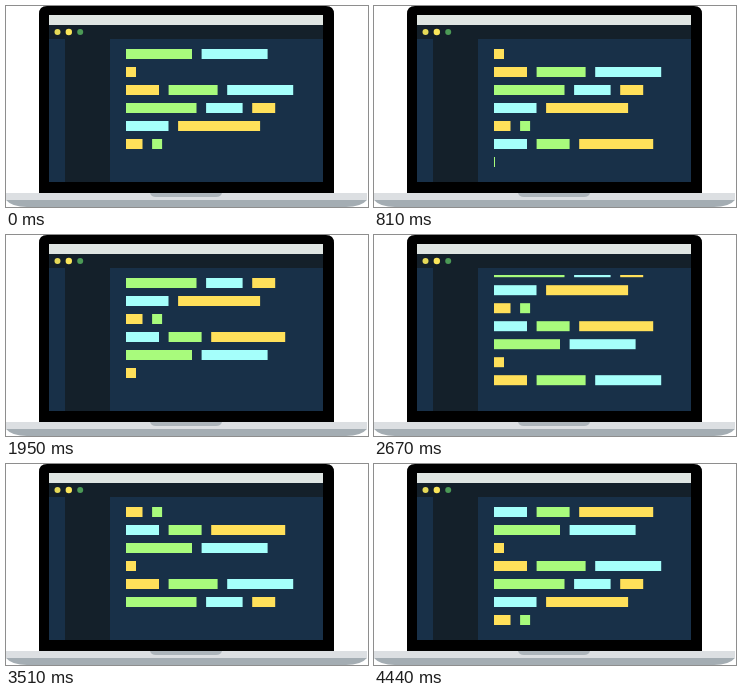
An HTML page for the animation above (4.5 s loop, 362 px wide and 201 px high).

```html
<!DOCTYPE html>
<html lang="en">
<head>
<meta charset="utf-8">
<title>Laptop typing code</title>
<style>
  html, body { margin: 0; width: 100%; height: 100%; overflow: hidden; background: #fff; }
  svg { display: block; width: 362px; height: 201px; }
  .g { fill: #a8fb7c; }
  .c { fill: #a5fffb; }
  .y { fill: #ffe05a; }
</style>
</head>
<body>
<svg viewBox="0 0 362 201">
  <defs>
    <clipPath id="view"><rect x="104" y="40" width="213" height="136"/></clipPath>
  </defs>

  <!-- lid and screen -->
  <path d="M33 187V8Q33 0 41 0H320Q328 0 328 8V187Z" fill="#000"/>
  <rect x="43" y="9" width="274" height="167" fill="#183048"/>
  <rect x="43" y="9" width="274" height="10" fill="#dfe5e2"/>
  <rect x="43" y="19" width="274" height="14" fill="#14202a"/>
  <rect x="59" y="33" width="45" height="143" fill="#14202a"/>
  <circle cx="51.5" cy="26" r="3" fill="#e6da58"/>
  <circle cx="62.8" cy="26" r="3.2" fill="#fbe65a"/>
  <circle cx="74.2" cy="26" r="3" fill="#4c9a56"/>

  <!-- base -->
  <path d="M0 194H361Q355 201 340 201H21Q6 201 0 194Z" fill="#a4adb3"/>
  <path d="M0 187H361V194H0Z" fill="#dcdfe2"/>
  <path d="M144 187H216Q215 191 210 191H150Q145 191 144 187Z" fill="#adb5bb"/>

  <g clip-path="url(#view)"><g id="code"></g></g>
</svg>
<script>
  const LOOP = 4500, FRAME = 30, PAUSE = 90, SCROLL = 150;
  const LEFT = 120, TOP = 43, ROW = 18, GAP = 9.6, SHOWN = 6;

  // each bar is a colour letter and a width
  const lines = [
    'g66 c66',
    'y10',
    'y33 g49 c66',
    'g70.5 c36.5 y23',
    'c42.5 y82',
    'y16.5 g10',
    'c33 g33 y74'
  ];
  const code = document.getElementById('code');
  const bars = [], scrolls = [];
  let clock = FRAME;

  function addBar(color, x, row, width) {
    const el = document.createElementNS('http://www.w3.org/2000/svg', 'rect');
    el.setAttribute('class', color);
    el.setAttribute('x', x);
    el.setAttribute('y', TOP + row * ROW);
    el.setAttribute('width', width);
    el.setAttribute('height', 10);
    code.append(el);
    return el;
  }

  for (let row = 0; row < SHOWN + lines.length; row++) {
    const typed = row >= SHOWN;
    const line = lines[row % lines.length].split(' ');
    let x = LEFT;
    for (const item of line) {
      const width = +item.slice(1);
      const el = addBar(item[0], x, row, width);
      x += width + GAP;
      if (typed) {
        const time = width >= 66 ? 150 : 60;
        bars.push({ el, width, start: clock, time });
        clock += time + PAUSE;
      }
    }
    if (typed) {
      if (line.length === 1) clock += 120; // the shortest line rests longer
      scrolls.push(clock);
      clock += SCROLL + PAUSE;
    }
  }

  const progress = (t, start, time) => Math.min(1, Math.max(0, (t - start) / time));

  function draw(t) {
    for (const { el, width, start, time } of bars) {
      const w = t < start ? 0 : Math.max(1, width * progress(t, start, time));
      el.setAttribute('width', w);
    }
    const rows = scrolls.reduce((sum, start) => sum + progress(t, start, SCROLL), 0);
    code.setAttribute('transform', `translate(0 ${-rows * ROW})`);
  }

  const begin = performance.now();
  function tick() {
    const t = (performance.now() - begin + 0.5) % LOOP;
    draw(Math.floor(t / FRAME) * FRAME);
    requestAnimationFrame(tick);
  }
  tick();
</script>
</body>
</html>
```
